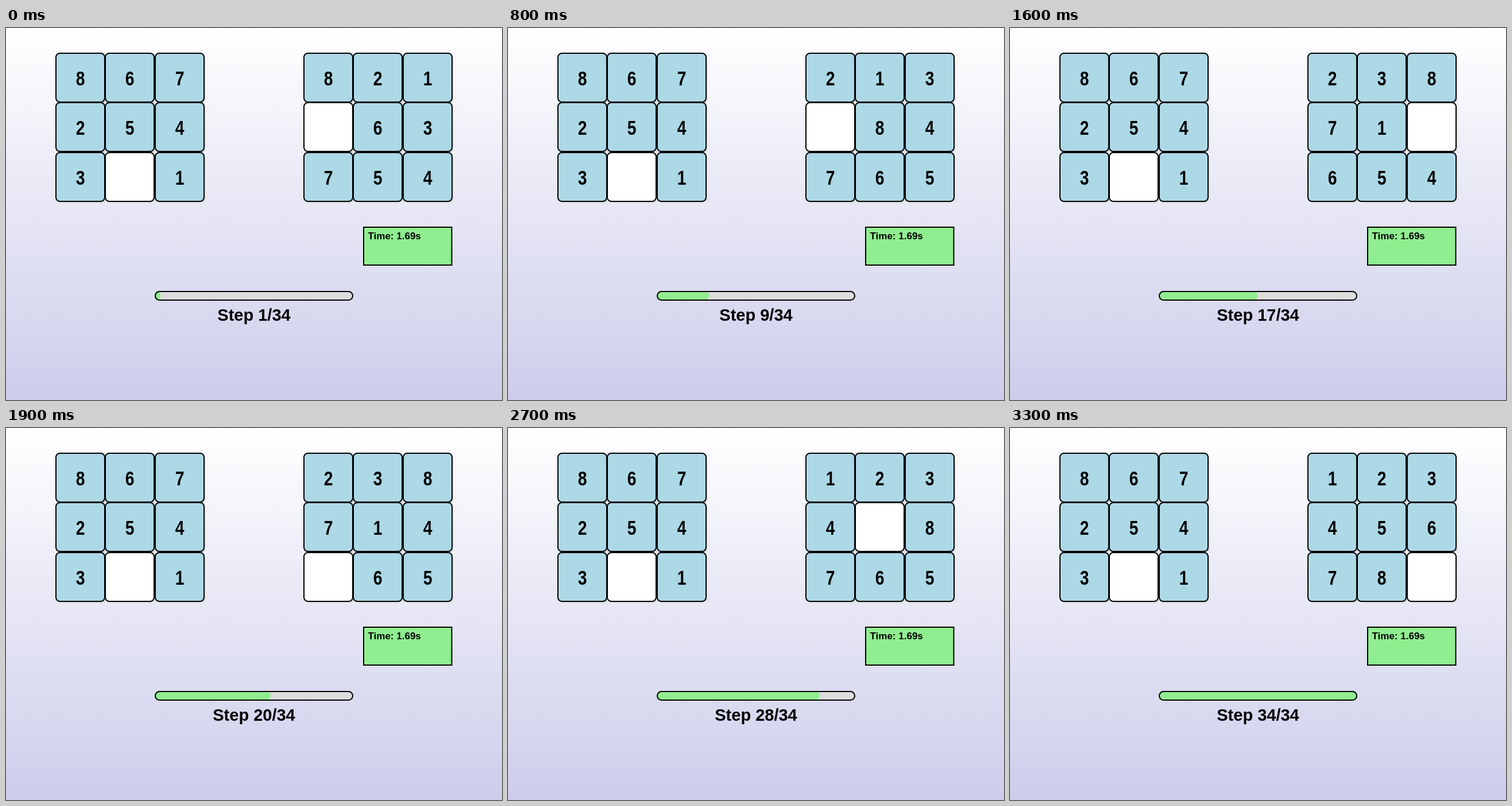
An HTML page with a canvas for the animation above (3400 ms loop, 864x648 px).

```html
<!DOCTYPE html>
<html lang="en">
<head>
<meta charset="utf-8">
<title>Eight puzzle</title>
<style>
  html, body { margin: 0; width: 100%; height: 100%; overflow: hidden; }
  canvas { display: block; }
</style>
</head>
<body>
<canvas id="stage" width="864" height="648"></canvas>
<script>
const ctx = document.getElementById('stage').getContext('2d');
const STEP_MS = 100;
const FONT = '"Liberation Sans", Arial, sans-serif';
const COLS = [0, 86, 173];
const ROWS = [43, 129, 216];

// Moves of the empty cell: up, down, left, right
const SHIFT = { U: -3, D: 3, L: -1, R: 1 };
const MOVES = 'URRDD' + 'LULDRR' + 'ULURD' + 'DLLURRU' + 'LLDR' + 'DRULDR';
const START = '8672543 1';
const boards = ['821 63754'];

for (const move of MOVES) {
  const cells = [...boards[boards.length - 1]];
  const gap = cells.indexOf(' ');
  const next = gap + SHIFT[move];
  [cells[gap], cells[next]] = [cells[next], cells[gap]];
  boards.push(cells.join(''));
}
const TOTAL = boards.length;

function roundRect(x, y, w, h, r) {
  ctx.beginPath();
  ctx.roundRect(x, y, w, h, Math.min(r, w / 2, h / 2));
}

function fillRound(x, y, w, h, r, color) {
  roundRect(x, y, w, h, r);
  ctx.fillStyle = color;
  ctx.fill();
}

function outline(x, y, w, h, r) {
  roundRect(x + 1, y + 1, w - 2, h - 2, r);
  ctx.lineWidth = 2;
  ctx.strokeStyle = '#000';
  ctx.stroke();
}

function label(text, x, y, size, align) {
  ctx.font = `bold ${size}px ${FONT}`;
  ctx.textAlign = align;
  ctx.fillStyle = '#000';
  ctx.fillText(text, x, y);
}

function drawTile(x, y, digit) {
  fillRound(x + 3, y + 3, 86, 86, 8, '#dcdcdc');
  fillRound(x, y, 87, 87, 8, digit === ' ' ? '#fff' : '#add8e6');
  outline(x, y, 87, 87, 7);
  // Condensed numerals
  ctx.save();
  ctx.translate(x + 43.5, y + 57);
  ctx.scale(0.82, 1);
  label(digit, 0, 0, 34.5, 'center');
  ctx.restore();
}

function drawBoard(left, cells) {
  [...cells].forEach((digit, i) => {
    drawTile(left + COLS[i % 3], ROWS[Math.floor(i / 3)], digit);
  });
}

function drawBackground() {
  const sky = ctx.createLinearGradient(0, 0, 0, 648);
  sky.addColorStop(0, '#fff');
  sky.addColorStop(1, 'rgb(205, 205, 235)');
  ctx.fillStyle = sky;
  ctx.fillRect(0, 0, 864, 648);
}

function drawTimer() {
  ctx.fillStyle = '#000';
  ctx.fillRect(622, 346, 155.5, 68);
  ctx.fillStyle = '#90ee90';
  ctx.fillRect(624, 348, 151.5, 64);
  label('Time: 1.69s', 630.5, 368, 17, 'left');
}

function drawProgress(step) {
  fillRound(259, 458, 346, 17, 8, '#dcdcdc');
  fillRound(259, 458, Math.floor(345 * step / TOTAL), 17, 8, '#90ee90');
  outline(259, 458, 346, 17, 8);
  label(`Step ${step}/${TOTAL}`, 432, 510, 29, 'center');
}

function draw(index) {
  drawBackground();
  drawBoard(86, START);
  drawBoard(518, boards[index]);
  drawTimer();
  drawProgress(index + 1);
}

const begin = performance.now();
let shown = -1;

function tick() {
  const index = Math.floor((performance.now() - begin) / STEP_MS) % TOTAL;
  if (index !== shown) draw(shown = index);
  requestAnimationFrame(tick);
}
tick();
</script>
</body>
</html>
```
